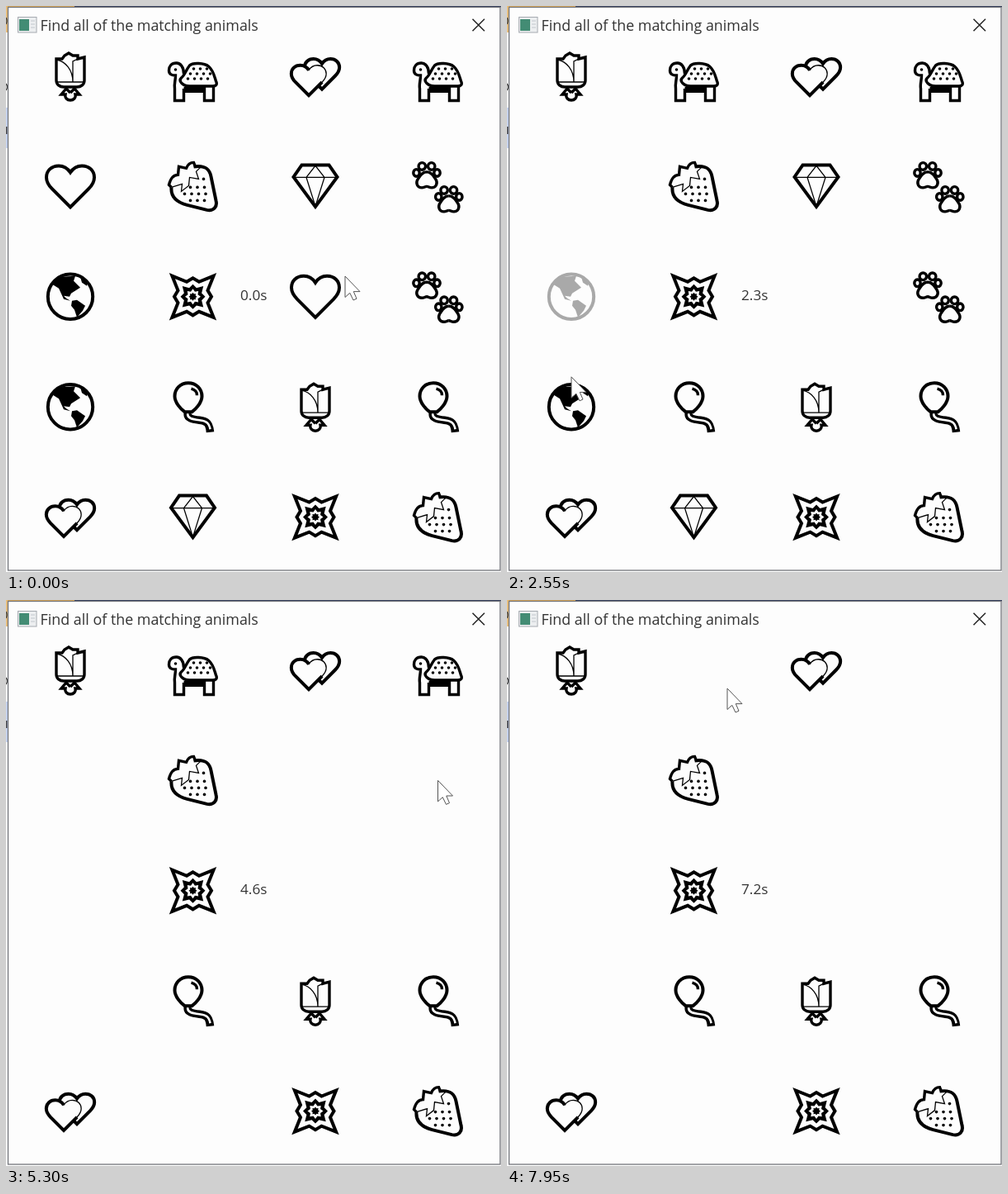
Recreate the animation shown at these times as an HTML page. Size 600 px wide and 685 px high, loop 8 s.

```html
<!DOCTYPE html>
<html lang="en">
<head>
<meta charset="utf-8">
<title>Matching game</title>
<style>
  html, body { margin: 0; width: 100%; height: 100%; overflow: hidden; background: #fdfdfd; }
  svg { display: block; width: 100vw; height: 100vh; }
  text { font-family: "Open Sans", "Noto Sans", sans-serif; fill: #333; }
  .icon { fill: none; stroke: currentColor; stroke-width: 4; color: #000; }
  .icon path { vector-effect: non-scaling-stroke; }
  .icon .thin { stroke-width: 1.3; }
  .icon .mid { stroke-width: 3.4; }
  .icon .solid { fill: currentColor; stroke: none; }
  .icon .cover { fill: #fdfdfd; }
  .icon .white { fill: #fdfdfd; stroke: none; }
</style>
</head>
<body>
<svg viewBox="0 0 600 685" xmlns="http://www.w3.org/2000/svg">
  <rect width="600" height="685" fill="#fdfdfd"/>
  <!-- desktop showing around the window -->
  <rect width="600" height="1.5" fill="#333c5c"/>
  <rect width="83" height="1.5" fill="#e5ae58"/>
  <rect width="2" height="32" fill="#e9bd78"/>
  <rect y="123" width="2" height="49" fill="#c6d3f0"/>
  <path d="M0 14q2 4 0 8M0 94q3 4 0 8M.7 146v9" fill="none" stroke="#333" stroke-width="1.3"/>
  <rect x="2.5" y="1.5" width="596.5" height="681.5" fill="#fdfdfd" stroke="#72747a" stroke-width="1.3"/>
  <!-- title bar -->
  <rect x="14.5" y="13.5" width="22.5" height="18.5" fill="#eceef0" stroke="#a5aab0"/>
  <rect x="16" y="16" width="12" height="14" fill="#438c74"/>
  <path d="M30 18h5M30 22h5M30 26h5" stroke="#c2c8ce"/>
  <text x="41.6" y="30" font-size="17.85">Find all of the matching animals</text>
  <path d="M565.5 15.700l14.500 14.500M580 15.700l-14.500 14.500" stroke="#222" stroke-width="1.5"/>
  <g id="board"></g>
  <text id="timer" x="284" y="356" font-size="17.2"></text>
  <path id="pointer" d="M0 0V25.500L5.800 20.300 10 29 14 27.200 10.300 18.600H18Z" fill="#fff" stroke="#555"/>
</svg>
<script>
const LOOP = 8000, STEP = 50;

const path = (d, cls = "") => `<path class="${cls}" d="${d}"/>`;
const place = (x, y, art, scale = 1) =>
  `<g transform="translate(${x} ${y}) scale(${scale})">${art}</g>`;
const mirror = art => art + `<g transform="scale(-1 1)">${art}</g>`;
const oval = (x, y, rx, ry = rx, cls = "") =>
  `<ellipse class="${cls}" cx="${x}" cy="${y}" rx="${rx}" ry="${ry}"/>`;

// Row of n seeds or spots
const dots = (x, y, n, gap) =>
  Array.from({ length: n }, (_, i) => oval(x + i * gap, y, 1.8, 1.8, "solid")).join("");

// Sixteen corners whose radii repeat, starting on a diagonal
function star(radii, cls = "") {
  const corners = Array.from({ length: 16 }, (_, i) => {
    const a = Math.PI * (i + 2) / 8, r = radii[i % radii.length];
    return `${r * Math.cos(a)} ${r * Math.sin(a)}`;
  });
  return `<path class="${cls}" stroke-miterlimit="8" d="M${corners.join("L")}Z"/>`;
}

const leftHeart = "M0-17C-4-23-9-25-14-25-23-25-29-19-29-11-29-5-26-1-22 3L0 25 22 3";
const fullHeart = leftHeart + "C26-1 29-5 29-11 29-19 23-25 14-25 9-25 4-23 0-17Z";

const paw = mirror(oval(12.5, -3, 3.7, 4.3, "mid") + oval(5.7, -11, 4.2, 4.3, "mid")) +
  mirror(path("M0-4C6-4 8 1 11 5 14 10 11 15 6 15 3 15 2 13.500 0 13.500", "mid"));

const rope = end => `M-6 7C-8 14 0 15 8 16 17 17 20 20 21 ${end}`;

const icons = {
  heart: path(fullHeart),
  hearts: place(8, -2.7, path(fullHeart), 0.73) +
    place(-8, 5, path(fullHeart, "thin cover") + path(leftHeart), 0.73),
  gem: path("M-16.500-26H16.500L26.500-11.500 0 24.500-26.500-11.500Z") +
    path("M-26-11H26M0 24-11-11 0-25 11-11Z", "thin"),
  paws: place(-13.5, -13.5, paw) + place(13.3, 15.5, paw),
  globe: oval(0, 0, 27.2) +
    path("M-22-15-12-24 6-25 4-19 12-11 1-4-1 0-8-1-5 2 0 5-8 3-14-10Z", "solid") +
    path("M12-24 21-18 20-13 14-17ZM2 5 8 4 18 11 15 17 8 25 5 16 1 11Z", "solid"),
  boom: star([35.5, 19.5, 22.5, 19.5]) + star([18, 11.5, 15, 11.5], "solid") +
    star([9.5, 6.5], "white") + star([5, 3.5], "solid"),
  balloon: `<path d="${rope(30.5)}" stroke-width="9.5"/>` +
    `<path d="${rope(27)}" stroke="#fdfdfd" stroke-width="2.6"/>` +
    path("M-5.500-29C4-29 11-22 11-13 11-5 3 3-1 6H-10C-14 3-22-5-22-13-22-22-15-29-5.500-29Z", "cover") +
    path("M-2-22C2-21 5-18 5-14", "mid"),
  rose: path("M-17 5V-21H-10L-7-25-2-28 3-25H9V-21L17-23V5C17 10 13 13 8 13H-8C-13 13-17 10-17 5Z", "mid") +
    path("M-17-20C-6-18 3-8 3 7V-18L9-21M-16 7H16", "thin") +
    mirror(path("M0 20 5 15 11 22H6C7 26 4 29 0 29", "mid")),
  turtle: path("M-11-3C-11-11-15-16-20-16-26-16-29-12-29-7-29-2-25-1-21-1-21 6-23 9-22 15V29.500H-11V15", "mid") +
    path("M-14 2C-10-1-8-8-4-13 0-17 14-16 19-12 25-7 26 0 28 6 30 10 28 12 24 12H-4C-12 12-18 6-14 2Z", "mid") +
    path("M14 13V29.500H25V13", "mid") + path("M-11 13H15V20H-11Z", "solid") +
    dots(-21, -8, 1, 0) + dots(1, -9, 3, 8) + dots(-3, -3, 4, 8) + dots(-6, 3, 4, 8),
  berry: path("M1-24C14-26 20-22 22-12L28 17C30 25 25 30 17 28.500L-7 22.500C-20 19-27 12-26 1", "") +
    path("M-26 1-29-2C-27-10-23-14-18-14L-17-24-8-22C-6-27-2-29 1-29L3-24", "mid") +
    path("M-26 1-13-3-14 6-5-1-4-11 7-9 4-18 9-23", "thin") +
    dots(13, -9, 1, 0) + dots(-3, 1, 3, 8.5) + dots(-10, 9, 4, 8.5) + dots(-3, 17, 3, 8.5)
};

const layout = `rose turtle hearts turtle heart berry gem paws globe boom
  heart paws globe balloon rose balloon hearts gem boom berry`.split(/\s+/);
const center = i => [78 + 148.5 * (i % 4), 85 + 133.4 * Math.floor(i / 4)];

// [time, cell]: every second pick completes a pair
const picks = [[500, 10], [1750, 4], [2200, 8], [2700, 12], [3500, 17],
  [4050, 6], [4800, 11], [5300, 7], [5700, 3], [7800, 1]];

// The pointer visits each picked cell and wanders a little in between
const wander = [[0, 411, 327], [3450, 236, 629], [4400, 436, 221],
  [6100, 419, 87], [7250, 305, 79], [7600, 171, 62], [7950, 267, 107]];
const route = [...picks.map(([t, i]) => [t, ...center(i)]), ...wander]
  .sort((a, b) => a[0] - b[0]);

// Seconds on the timer, which runs a little unevenly
const clock = [[0, 0.03], [1700, 1.65], [3450, 3.05], [4400, 4.03],
  [6100, 5.23], [7250, 6.25], [7950, 7.22]];

// Monotone cubic through the keys, without overshoot
function follow(keys, t, axis) {
  const slope = i => keys[i] && keys[i + 1]
    ? (keys[i + 1][axis] - keys[i][axis]) / (keys[i + 1][0] - keys[i][0]) : 0;
  const tangent = i => {
    const a = slope(i - 1), b = slope(i);
    return a * b > 0 ? 2 * a * b / (a + b) : 0;
  };
  let i = 0;
  while (i < keys.length - 2 && keys[i + 1][0] <= t) i++;
  const h = keys[i + 1][0] - keys[i][0];
  const u = Math.min(1, (t - keys[i][0]) / h), v = 1 - u;
  return keys[i][axis] * (1 + 2 * u) * v * v + keys[i + 1][axis] * u * u * (3 - 2 * u) +
    h * u * v * (tangent(i) * v - tangent(i + 1) * u);
}

const board = document.getElementById("board");
const timer = document.getElementById("timer");
const pointer = document.getElementById("pointer");

board.innerHTML = layout.map((name, i) =>
  `<g class="icon">${place(...center(i), icons[name])}</g>`).join("");

function draw(t) {
  picks.forEach(([time, cell], n) => {
    const matched = picks[n | 1][0], style = board.children[cell].style;
    style.color = t >= time ? "#a9a9a9" : "#000";
    style.display = t >= matched ? "none" : "";
  });
  timer.textContent = (Math.floor(follow(clock, t, 1) * 10) / 10).toFixed(1) + "s";
  pointer.setAttribute("transform", `translate(${follow(route, t, 1)} ${follow(route, t, 2)})`);
}

const start = performance.now();
function tick() {
  const t = (performance.now() - start) % LOOP;
  draw(Math.floor(t / STEP) * STEP);
  requestAnimationFrame(tick);
}
tick();
</script>
</body>
</html>
```
